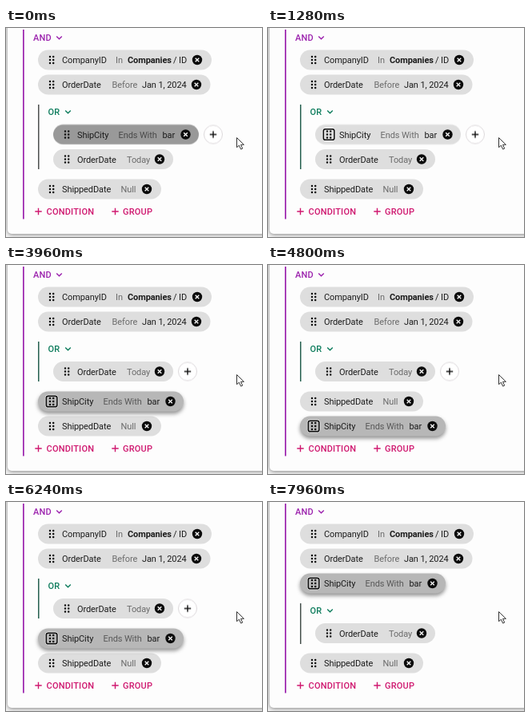
Animation, 320 px wide and 262 px high, one loop 8 s. Source, as an HTML page:

```html
<!DOCTYPE html>
<html lang="en">
<head>
<meta charset="utf-8">
<title>Query builder: reordering conditions</title>
<style>
html, body { margin: 0; width: 100%; height: 100%; overflow: hidden; background: #f2f2f2; }
svg { display: block; overflow: hidden; }
text { font: 400 11px Roboto, "Open Sans", sans-serif; letter-spacing: -.1px; fill: #1c1c1c; }
.card { fill: #fdfdfd; filter: drop-shadow(0 1px 2.5px rgba(0, 0, 0, .45)); }
.op { fill: #000; fill-opacity: .52; }
.bold { font-weight: 700; }
.label { font-weight: 500; letter-spacing: .2px; }
.chip { fill: #dedede; }
.and { --c: #9b21ad; }
.or { --c: #0d7c5c; }
.add { --c: #cf176f; }
.label, .bar { fill: var(--c); }
.stroke { fill: none; stroke: var(--c); stroke-width: 1.4; }

.ship, .today, .shipped, .plus, .group, .line, .ring, .ship .chip {
  animation: 8s step-end infinite;
}
.ship { animation-name: ship; }
.ship .chip { animation-name: lift; }
.ring { animation-name: ring; }
.today { animation-name: today; }
.shipped { animation-name: shipped; }
.plus { animation-name: plus; }
.group { animation-name: group; }
.line { animation-name: line; }

@keyframes ship {
  0% { transform: translate(59px, 133.5px); }
  25.5% { transform: translate(59px, 164.5px); }
  38.5%, 65% { transform: translate(40px, 171px); }
  51.5% { transform: translate(40px, 202px); }
  78.5% { transform: translate(59px, 133.5px); }
  91.75%, 100% { transform: translate(40px, 102px); }
}
@keyframes lift {
  0% { fill: #999; filter: none; }
  7% { fill: #dedede; filter: none; }
  25.5%, 100% { fill: #b7b7b7; filter: drop-shadow(0 3px 2.5px rgba(0, 0, 0, .42)); }
}
@keyframes ring {
  0% { visibility: hidden; }
  7%, 100% { visibility: visible; }
}
@keyframes today {
  0% { transform: translate(59px, 164.5px); }
  25.5% { transform: translate(59px, 133.5px); }
  78.5%, 100% { transform: translate(59px, 164.5px); }
}
@keyframes shipped {
  0% { transform: translate(40px, 202px); }
  51.5% { transform: translate(40px, 171px); }
  65%, 100% { transform: translate(40px, 202px); }
}
@keyframes plus {
  0% { transform: translate(259px, 133.5px); visibility: visible; }
  25.5% { transform: translate(227px, 133.5px); visibility: visible; }
  78.5%, 100% { visibility: hidden; }
}
@keyframes group {
  0% { transform: translateY(0); }
  91.75%, 100% { transform: translateY(31px); }
}
@keyframes line {
  0% { y: 96px; height: 81px; fill: #4c4f4e; }
  7% { y: 96px; height: 81px; fill: #25604f; }
  38.5% { y: 96px; height: 50px; fill: #25604f; }
  78.5% { y: 96px; height: 81px; fill: #25604f; }
  91.75%, 100% { y: 127px; height: 51px; fill: #46504c; }
}
</style>
</head>
<body>
<svg width="320" height="262" viewBox="0 0 320 262">
  <defs>
    <path id="dots" d="M15 -4h0M15 0h0M15 4h0M19.2 -4h0M19.2 0h0M19.2 4h0"
      stroke="#111" stroke-width="2.5" stroke-linecap="round"/>
    <g id="close">
      <circle r="6.2" fill="#0b0b0b"/>
      <path d="M-2.3 -2.3L2.3 2.3M2.3 -2.3L-2.3 2.3" stroke="#fff" stroke-width="1.3"/>
    </g>
    <path id="chevron" d="M-3.3 -1.6L0 1.7L3.3 -1.6"/>
    <path id="cross" d="M-4.2 0H4.2M0 -4.2V4.2"/>
  </defs>

  <rect class="card" x="2" y="-20" width="340" height="278" rx="5"/>

  <g class="and">
    <rect class="bar" x="21" y="2" width="1.7" height="237.5"/>
    <text class="label" x="34" y="16">AND</text>
    <use href="#chevron" class="stroke" x="66.5" y="12"/>
  </g>

  <g transform="translate(40 40)">
    <rect class="chip" y="-12.5" width="217" height="25" rx="12.5"/>
    <use href="#dots"/>
    <text x="30" y="4">CompanyID</text>
    <text class="op" x="97" y="4">In</text>
    <text class="bold" x="112" y="4">Companies</text>
    <text x="169" y="4">/ ID</text>
    <use href="#close" x="199"/>
  </g>

  <g transform="translate(40 71)">
    <rect class="chip" y="-12.5" width="215.5" height="25" rx="12.5"/>
    <use href="#dots"/>
    <text x="30" y="4">OrderDate</text>
    <text class="op" x="92.5" y="4">Before</text>
    <text x="130" y="4">Jan 1, 2024</text>
    <use href="#close" x="198"/>
  </g>

  <rect class="line" x="40" y="96" width="1.5" height="81"/>
  <g class="or group">
    <text class="label" x="52.5" y="109">OR</text>
    <use href="#chevron" class="stroke" x="77.5" y="105"/>
  </g>

  <g class="today">
    <rect class="chip" y="-12.5" width="150" height="25" rx="12.5"/>
    <use href="#dots"/>
    <text x="30" y="4">OrderDate</text>
    <text class="op" x="92" y="4">Today</text>
    <use href="#close" x="133"/>
  </g>

  <g class="shipped">
    <rect class="chip" y="-12.5" width="154" height="25" rx="12.5"/>
    <use href="#dots"/>
    <text x="30" y="4">ShippedDate</text>
    <text class="op" x="103.5" y="4">Null</text>
    <use href="#close" x="136"/>
  </g>

  <g class="ship">
    <rect class="chip" y="-12.5" width="182" height="25" rx="12.5"/>
    <g class="ring" fill="none">
      <rect x="9.3" y="-7.8" width="15.6" height="15.6" rx="3.2" stroke="#fff"/>
      <rect x="10.3" y="-6.8" width="13.6" height="13.6" rx="2.4" stroke="#0b0b0b" stroke-width="1.5"/>
    </g>
    <use href="#dots"/>
    <text x="30" y="4">ShipCity</text>
    <text class="op" x="81.5" y="4">Ends With</text>
    <text x="136.5" y="4">bar</text>
    <use href="#close" x="165.5"/>
  </g>

  <g class="plus">
    <circle r="11.5" fill="#fff" stroke="#dcd8db"/>
    <use href="#cross" fill="none" stroke="#111" stroke-width="1.4"/>
  </g>

  <g class="add">
    <use href="#cross" class="stroke" x="40.5" y="230"/>
    <text class="label" x="50.5" y="234">CONDITION</text>
    <use href="#cross" class="stroke" x="136.5" y="230"/>
    <text class="label" x="146" y="234">GROUP</text>
  </g>

  <path d="M288.5 137.5v12.2l2.9 -2.6l2.2 4.9l2.1 -.9l-2.2 -4.8h3.9z"
    fill="#fff" stroke="#333" stroke-width="1" stroke-linejoin="round"/>
</svg>
</body>
</html>
```
